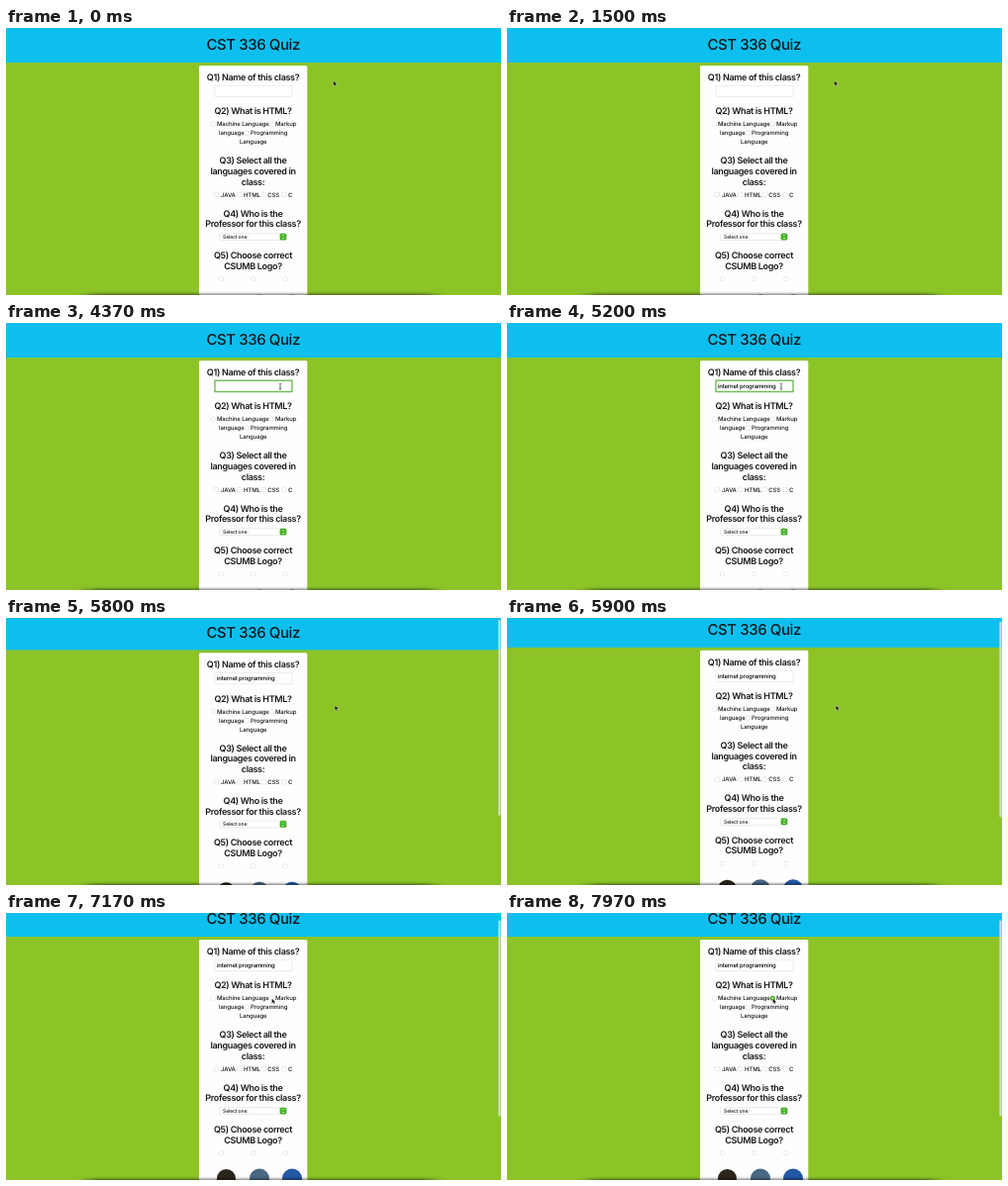
Write an HTML page that moves like this. It is 500 by 270 pixels and loops after 8 s.

```html
<!DOCTYPE html>
<html lang="en">
<head>
<meta charset="utf-8">
<title>CST 336 Quiz</title>
<style>
  html, body { margin: 0; width: 100%; height: 100%; overflow: hidden; background: #8cc428; }
  svg { display: block; width: 100%; height: 100%; }
  text { font: 500 6px Inter, Roboto, sans-serif; letter-spacing: -.12px; fill: #14171a; text-rendering: geometricPrecision; }
  .title { font-size: 15px; letter-spacing: -.42px; text-anchor: middle; }
  .question { font-size: 9px; font-weight: 600; letter-spacing: -.34px; text-anchor: middle; }
  #answer { letter-spacing: -.19px; fill: #000; }
  .select { font-size: 5px; letter-spacing: -.1px; }
  .control { fill: #fff; stroke: #d5d5d5; stroke-width: .5; }
</style>
</head>
<body>
<svg viewBox="0 0 500 270" preserveAspectRatio="none">
  <defs>
    <filter id="soft" x="-10%" y="-300%" width="120%" height="700%"><feGaussianBlur stdDeviation="8 1.8"/></filter>
  </defs>
  <rect width="500" height="270" fill="#8cc428"/>
  <g id="page">
    <rect width="500" height="35" fill="#0dbfee"/>
    <text class="title" x="249.7" y="22.4">CST 336 Quiz</text>
    <rect x="195" y="38" width="109.3" height="300" rx="1.6" fill="#fefefe"/>
    <g id="questions"></g>

    <rect id="field" x="211" y="58.2" width="78" height="11.3" fill="#fff"/>
    <text id="answer" x="213" y="66.1"></text>
    <path id="caret" d="M212.9 60.6v6.6" stroke="#222" stroke-width=".5"/>

    <g id="labels"></g>
    <g id="controls"></g>
    <circle id="picked" cx="268.3" cy="97.2" r="2.5" fill="#3fb618"/>
    <circle id="dot" cx="268.3" cy="97.2" r=".9" fill="#fff"/>

    <rect class="control" x="215.5" y="207.8" width="68" height="6.8" rx="1.6"/>
    <text class="select" x="219" y="213">Select one:</text>
    <rect x="276.6" y="207.8" width="6.6" height="6.6" rx="1.5" fill="#3fae1f"/>
    <path d="M278.6 210.4l1.3-1.3 1.3 1.3M278.6 211.9l1.3 1.3 1.3-1.3" fill="none" stroke="#fff" stroke-width=".7"/>

    <circle cx="222.5" cy="279.5" r="9.5" fill="#2b251b"/>
    <circle cx="256" cy="279.5" r="10" fill="#486884"/>
    <circle cx="289" cy="279.5" r="10" fill="#2459a5"/>
  </g>
  <rect id="thumb" x="497.4" width="2.2" height="198" rx="1.1" fill="#dde2dc" opacity=".9"/>
  <rect x="82" y="269" width="350" height="8" filter="url(#soft)" opacity=".6"/>
  <path id="arrow" d="M0 0V5.4L1.3 4.2 2.1 6 3 5.6 2.2 3.9H3.9Z" fill="#111" stroke="#fff" stroke-width=".35"/>
  <path id="beam" d="M-1.2-3Q0-3 0-2.3Q0-3 1.2-3M0-2.3V2.3M-1.2 3Q0 3 0 2.3Q0 3 1.2 3M-.7 1H.7" fill="none" stroke="#222" stroke-width=".6"/>
</svg>
<script>
const LOOP = 8000;
const $ = id => document.getElementById(id);

function add(parent, tag, attributes, content = "") {
  const node = document.createElementNS("http://www.w3.org/2000/svg", tag);
  for (const [name, value] of Object.entries(attributes)) node.setAttribute(name, value);
  node.textContent = content;
  $(parent).append(node);
}

const questions = [
  [53.1, "Q1) Name of this class?"],
  [87.2, "Q2) What is HTML?"],
  [137.2, "Q3) Select all the", "languages covered in", "class:"],
  [190.6, "Q4) Who is the", "Professor for this class?"],
  [233, "Q5) Choose correct", "CSUMB Logo?"]
];
for (const [top, ...lines] of questions) {
  lines.forEach((line, i) => add("questions", "text", { class: "question", x: 249.5, y: top + i * 10.7 }, line));
}

const labels = [
  [213, 99.3, "Machine Language"], [272, 99.3, "Markup"],
  [215, 108.3, "language"], [247, 108.3, "Programming"], [236, 117.4, "Language"],
  [217, 170.7, "JAVA"], [240, 170.7, "HTML"], [264.3, 170.7, "CSS"], [285, 170.7, "C"]
];
for (const [x, y, label] of labels) add("labels", "text", { x, y }, label);

const radios = [[209.3, 97.2], [268.3, 97.2], [243.2, 106.3], [217.5, 253.7], [249.8, 253.7], [282, 253.7]];
for (const [cx, cy] of radios) add("controls", "circle", { class: "control", cx, cy, r: 2.4 });
for (const x of [210, 233.5, 258, 278.7]) {
  add("controls", "rect", { class: "control", x, y: 166.2, width: 4.5, height: 4.5, rx: .8 });
}

const ANSWER = "internet programming";
const FOCUS = 2500, TYPE_START = 4400, TYPE_END = 5150, BLUR = 5560, PICK = 7250;

// Each stop is [time, ...values]; values ease between neighbouring stops.
const pointerPath = [
  [0, 330.6, 53.2], [1850, 330.6, 53.2], [2350, 277, 64.3], [5200, 277, 64.3],
  [5500, 332.2, 88.2], [6120, 332.2, 88.2], [6450, 255.2, 90], [6850, 255.2, 90], [7150, 268.5, 86.3]
];
const scrollPath = [[5600, 0], [6225, 11]];

function follow(path, t) {
  const next = path.findIndex(stop => stop[0] > t);
  if (next === 0) return path[0].slice(1);
  if (next < 0) return path[path.length - 1].slice(1);
  const [from, to] = [path[next - 1], path[next]];
  const u = (t - from[0]) / (to[0] - from[0]);
  const eased = u * u * (3 - 2 * u);
  return from.slice(1).map((value, i) => value + (to[i + 1] - value) * eased);
}

const show = (id, visible) => $(id).setAttribute("visibility", visible ? "visible" : "hidden");
const move = (id, x, y) => $(id).setAttribute("transform", `translate(${x} ${y})`);

function render(t) {
  const [scroll] = follow(scrollPath, t);
  move("page", 0, -scroll);
  $("thumb").setAttribute("y", scroll * .68);
  show("thumb", t >= scrollPath[0][0]);

  const focused = t >= FOCUS && t < BLUR;
  $("field").setAttribute("stroke", focused ? "#70b95a" : "#dcdcdc");
  $("field").setAttribute("stroke-width", focused ? 1.4 : .5);

  const typed = Math.min(1, Math.max(0, (t - TYPE_START) / (TYPE_END - TYPE_START)));
  $("answer").textContent = ANSWER.slice(0, Math.floor(typed * ANSWER.length));
  move("caret", typed ? $("answer").getComputedTextLength() : 0, 0);
  const typing = typed > 0 && typed < 1;
  show("caret", focused && (typing || (t - FOCUS) % 1000 < 500));

  show("picked", t >= PICK);
  show("dot", t >= PICK);

  const [x, y] = follow(pointerPath, t);
  const overField = x > 211 && x < 289 && y > 58 && y < 70;
  move("arrow", x, y);
  move("beam", x, y);
  show("arrow", !overField);
  show("beam", overField && !typing);
}

function tick() {
  render(performance.now() % LOOP);
  requestAnimationFrame(tick);
}
tick();
</script>
</body>
</html>
```
